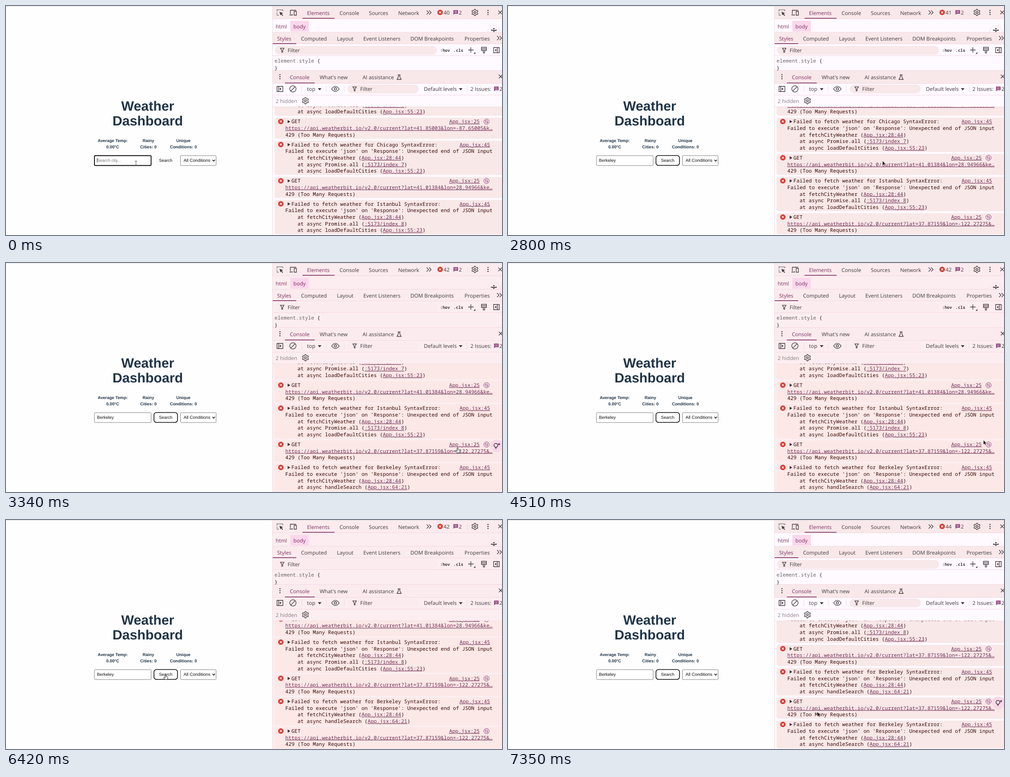
These frames come from a looping animation (1099 by 510 pixels, 8 s). An HTML page:

```html
<!DOCTYPE html>
<html lang="en">
<head>
<meta charset="utf-8">
<title>Weather Dashboard</title>
<style>
  html, body { margin: 0; width: 100%; height: 100%; overflow: hidden; background: #fefefe; }
  svg { display: block; width: 100%; height: 100%; --bar: #f8e8ea; --body: #fffaff; --row: #f8e8e8; }
  svg.warm { --bar: #fbebee; --body: #fcedf0; --row: #fbe8e7; }
  text { white-space: pre; text-rendering: geometricPrecision; }
  .page { font-family: "Liberation Sans", Arial, sans-serif; }
  .bold { font-weight: 700; fill: #213547; }
  .ui { font: 500 11.65px "Open Sans", "Noto Sans", sans-serif; fill: #41383d; }
  .on { fill: #7c2e62; }
  .mono { font: 11.25px "Noto Sans Mono", "DejaVu Sans Mono", monospace; fill: #380a08; }
  .link { fill: #743058; text-decoration: underline 1px; text-underline-offset: 1px; }
  .bar { fill: var(--bar); }
  .body { fill: var(--body); }
  .row { fill: var(--row); }
  .sep { stroke: #f5d7e3; fill: none; }
  .ico { stroke: #41383d; fill: none; stroke-width: 1.3; }
  .solid { fill: #41383d; }
</style>
</head>
<body>
<svg id="stage" viewBox="0 0 1099 510" preserveAspectRatio="none"></svg>
<script>
const stage = document.getElementById('stage');
const LOOP = 8000, LINE = 14.7, GAP = 7.2;

// ---- markup helpers ----
const rect = (x, y, w, h, attrs = '') => `<rect x="${x}" y="${y}" width="${w}" height="${h}" ${attrs}/>`;
const circle = (x, y, r, attrs = '') => `<circle cx="${x}" cy="${y}" r="${r}" ${attrs}/>`;
const path = (d, attrs = 'class="ico"') => `<path d="${d}" ${attrs}/>`;
const text = (x, y, s, attrs) => `<text x="${x}" y="${y}" ${attrs}>${s}</text>`;
const ui = (x, y, s, extra = '') => text(x, y, s, `class="ui ${extra}"`);
const mono = (x, y, s, extra = '') => text(x, y, s, `class="mono" ${extra}`);
const link = s => `<tspan class="link">${s}</tspan>`;
const at = (x, y, s, attrs = '') => `<g transform="translate(${x} ${y})" ${attrs}>${s}</g>`;

// ---- icons ----
const errorIcon = (x, y) => at(x, y, circle(0, 0, 6, 'fill="#dc362e"') +
  path('M-2.3-2.3L2.3 2.3M2.3-2.3L-2.3 2.3', 'stroke="#fff" stroke-width="1.3"'));
const issueIcon = (x, y) => at(x, y, path('M-5-5H5V3H-2.5L-5 5.5Z', 'fill="#8b3a78"') +
  path('M-3-2.4H3M-3 .4H3', 'stroke="#f8e8ea" stroke-width="1.1"'));
// Six teeth: two outer and two inner corners each
const gearOutline = Array.from({ length: 24 }, (_, i) => {
  const angle = (i - .5) * Math.PI / 12, r = i % 4 < 2 ? 7.2 : 5.2;
  return (r * Math.sin(angle)).toFixed(2) + ' ' + (-r * Math.cos(angle)).toFixed(2);
}).join('L');
const gear = (x, y) => at(x, y, path(`M${gearOutline}Z`, 'class="ico" stroke-linejoin="round"') + circle(0, 0, 2.2, 'class="ico"'));
const dots = (x, y) => [-4.5, 0, 4.5].map(d => circle(x, y + d, 1.35, 'class="solid"')).join('');
const chevrons = (x, y) => at(x, y, path('M-5-4.5L-.5 0L-5 4.5M.5-4.5L5 0L.5 4.5'));
const cross = (x, y) => at(x, y, path('M-4-4L4 4M4-4L-4 4'));
const funnel = (x, y) => at(x, y, path('M-4-4.5H4L1 0V4.5H-1V0Z'));
const down = (x, y) => path(`M${x - 4} ${y - 2}h8l-4 5z`, 'class="solid"');

function page() {
  const mid = (x, y, s, size) => text(x, y, s, `class="page bold" font-size="${size}" text-anchor="middle"`);
  const stat = (x, a, b) => mid(x, 303, a, 9.35) + mid(x, 317, b, 9.35);
  return rect(0, 0, 1099, 510, 'fill="#fefefe"') +
    mid(314, 233.4, 'Weather', 29.9) + mid(314, 266.2, 'Dashboard', 29.9) +
    stat(236.5, 'Average Temp:', '0.00°C') + stat(315.5, 'Rainy', 'Cities: 0') + stat(393, 'Unique', 'Conditions: 0') +
    rect(196, 333.3, 125.5, 22, 'id="field" rx="1.5" fill="#fff"') +
    text(201.5, 347, '', 'id="typed" class="page"') +
    rect(0, 338.5, .9, 10, 'id="caret" fill="#222"') +
    rect(327.8, 333, 52.2, 22, 'id="button" rx="5.5" fill="#fdfdfd"') +
    text(339, 346.8, 'Search', 'class="page" font-size="9.35" fill="#111"') +
    rect(386.5, 333.3, 79, 22, 'rx="1.5" fill="#fff" stroke="#808080"') +
    text(393.5, 347.3, 'All Conditions', 'class="page" font-size="9.7" fill="#111"') +
    path('M457.5 342.5L460.3 345.6L463.1 342.5', 'fill="none" stroke="#111" stroke-width="1.5"');
}

function panels() {
  const strip = (y, h, cls) => rect(590, y, 509, h, `class="${cls}"`);
  const lines = [28.5, 58.5, 84.5, 110.5, 143.5, 172.5, 198.5, 224.5]
    .map(y => path(`M590 ${y}H1099`, 'class="sep"')).join('');
  const under = (x, y, w) => rect(x, y, w, 1.6, 'fill="#7c2e62"');
  const tabs = (y, list) => list.map(([x, s, on]) => ui(x, y, s, on ? 'on' : '')).join('');

  const top = path('M600.5 12V8.5H613.5V12M600.5 15V20.5H605', 'class="ico" stroke-dasharray="2 1.4"') +
    path('M606 13L614 16L610.7 17.4L614 20.7L612.7 22L609.4 18.7L608 21Z', 'class="solid"') +
    path('M630 18V9.5H643M628 20H636M638.5 12H643.5V20.5H638.5Z') +
    tabs(20, [[667, 'Elements', 1], [739, 'Console'], [804, 'Sources'], [869, 'Network']]) +
    under(657, 26.6, 71) + chevrons(937, 14.5) + errorIcon(962, 14.3) + ui(969.6, 18.6, '', 'count') +
    issueIcon(996.5, 14.3) + ui(1003.3, 18.6, '2') + path('M1022.5 8V22', 'class="sep"') +
    gear(1039, 14.3) + dots(1068, 14.3) + cross(1095, 14.3);

  const crumbs = rect(630, 33, 41, 24, 'fill="#fbd7ec"') + ui(597.5, 50, 'html', 'on') + ui(636.8, 50, 'body', 'on') +
    `<clipPath id="crumbClip">${rect(1060, 30, 39, 28)}</clipPath><g clip-path="url(#crumbClip)">` +
    circle(1081, 57, 13.5, 'class="body" stroke="#f3dfe8"') + circle(1081, 50.6, 1.6, 'class="solid"') +
    path('M1074.5 53.5Q1081 55.5 1087.5 53.5M1081 54V60', 'class="ico" style="stroke-width:1.9"') + '</g>';

  const styles = tabs(77, [[600.7, 'Styles', 1], [653.7, 'Computed'], [733.3, 'Layout'], [791.7, 'Event Listeners'],
    [896, 'DOM Breakpoints'], [1016, 'Properties']]) + under(590, 83, 53) + chevrons(1093, 71.5) +
    rect(596, 89, 359, 19.5, 'rx="9.7" class="bar"') + funnel(612, 98.7) + ui(624, 103, 'Filter') +
    [[962, ':hov'], [991.5, '.cls']].map(([x, s]) => mono(x, 101.8, s, 'style="font-size:9px;font-weight:600;fill:#3d3439"')).join('') +
    path('M1024 98H1036M1030 92V104') + path('M1036 106.5h4v-4z', 'class="solid"') +
    path('M1053.5 92H1064.5V99H1053.5ZM1053.5 95.5H1064.5M1057.5 99V104.5H1060.5V99') +
    path('M1080.5 92.5H1093V104H1080.5ZM1089 92.5V104') + path('M1086.5 95v6.4l-3.4-3.2z', 'class="solid"') +
    mono(595, 126, '<tspan fill="#6c6468">element.style</tspan> {', 'style="fill:#2b2226"') +
    mono(595, 141.5, '}', 'style="fill:#2b2226"');

  const drawer = dots(607, 157.5) +
    tabs(163, [[629, 'Console', 1], [695, "What's new"], [790, 'AI assistance']]) + under(618, 170.6, 66) +
    path('M868 153.5H874M869.5 153.5V157.5L866.3 163.5H875.7L872.5 157.5V153.5') + cross(1096, 157) +
    path('M600.5 179H613.5V190.5H600.5ZM604 179V190.5') + path('M606.5 181.8v6l4-3z', 'class="solid"') +
    circle(635.7, 184.6, 7, 'class="ico"') + path('M630.8 189.5L640.6 179.7') +
    path('M655.5 178V192M709.5 178V192M749.5 178V192M1021.5 178V192', 'class="sep"') +
    ui(667, 189, 'top') + down(695, 185) +
    path('M721.5 184.6Q729.8 173 738.2 184.6Q729.8 196.2 721.5 184.6Z') + circle(729.8, 184.6, 2.6, 'class="ico"') +
    rect(757, 175, 157.5, 19.5, 'rx="9.7" class="bar"') + funnel(772.5, 184.6) + ui(784.8, 189, 'Filter') +
    ui(926, 189, 'Default levels') + down(1007.5, 185) + ui(1029, 189, '2 Issues:') +
    issueIcon(1086.5, 184.6) + ui(1093.3, 189, '2') +
    `<g opacity=".62">${ui(597.5, 216, '2 hidden')}</g>` + gear(663.5, 211);

  return strip(0, 510, 'body') + strip(0, 28, 'bar') + strip(59, 25, 'bar') + strip(144, 28, 'bar') + lines +
    top + crumbs + styles + drawer +
    path('M590.5 0V510', 'stroke="#ecdce2"') + path('M0 .5H1099', 'stroke="#dcdcdc"');
}

// ---- console log ----
const request = coords => ({
  src: 'App.jsx:25', net: true,
  lines: ['  GET', link(`https://api.weatherbit.io/v2.0/current?${coords}…`), '429 (Too Many Requests)']
});
const frame = (fn, loc) => `    at ${fn} (${link(loc)})`;
const failure = (city, ...rest) => ({
  src: 'App.jsx:45',
  lines: [`  Failed to fetch weather for ${city} SyntaxError:`,
    "Failed to execute 'json' on 'Response': Unexpected end of JSON input",
    frame('fetchCityWeather', 'App.jsx:28:44'), ...rest]
});
const loaded = (city, i) => failure(city, frame('async Promise.all', ':5173/index ' + i),
  frame('async loadDefaultCities', 'App.jsx:55:23'));
const searched = () => [request('lat=37.87159&amp;lon=-122.27275&amp;'),
  failure('Berkeley', frame('async handleSearch', 'App.jsx:64:21'))];

const log = [
  loaded('Toronto', 6),
  request('lat=41.85003&amp;lon=-87.65005&amp;k'), loaded('Chicago', 7),
  request('lat=41.01384&amp;lon=28.94966&amp;ke'), loaded('Istanbul', 8),
  ...searched(), ...searched()
];
const rowHeight = row => row.lines.length * LINE + GAP;

function consoleLog() {
  let y = 248.7 - rowHeight(log[0]);
  const rows = log.map(row => {
    const mid = y + 8.8, base = mid + 3.7;
    const out = `<g>${rect(595, y, 512, rowHeight(row) - 4.4, 'rx="5" class="row"')}` +
      errorIcon(609, mid - .3) + path(`M624 ${mid - 3.6}v7.2l6-3.6z`, 'class="solid"') +
      row.lines.map((s, i) => mono(619, base + i * LINE, s)).join('') +
      mono(row.net ? 982 : 1005, base, link(row.src)) +
      (row.net ? circle(1064.7, mid, 5.8, 'fill="none" stroke="#8b3a78"') +
        at(1064.7, mid, path('M-1.8 3.2V-3M-3.4-1.4L-1.8-3L-.2-1.4M1.8-3.2V3M.2 1.4L1.8 3L3.4 1.4', 'fill="none" stroke="#8b3a78"')) : '') + '</g>';
    y += rowHeight(row);
    return out;
  });
  return `<clipPath id="logClip">${rect(590, 224.5, 509, 286)}</clipPath>` +
    `<g clip-path="url(#logClip)"><g id="log">${rows.join('')}</g></g>`;
}

const hint = `<g id="hint">${circle(0, 0, 12.8, 'fill="#fbd9ec" stroke="#eec6dc"')}` +
  circle(-1.5, -1, 4.2, 'class="ico" style="stroke-width:1.6"') + path('M-3.5 4.5H.5M-2.5 6.8H-.5') +
  path('M5.5-6.8L6.4-4.4L8.8-3.5L6.4-2.6L5.5-.2L4.6-2.6L2.2-3.5L4.6-4.4Z', 'class="solid"') + '</g>';

const cursors = `<g id="cursor">
  ${path('M0 0V9.8L2.2 7.8L3.7 11L5.1 10.4L3.7 7.2H6.7Z', 'data-kind="arrow" fill="#000" stroke="#fff" stroke-width=".5"')}
  ${path('M-1 .8C-1-.4 1-.4 1 .8V4.6L4 5.2Q5.2 5.6 5 7.3L4 11.8H-1.6L-4.4 7.8Q-4.2 6-2.8 7L-1 8.2Z', 'data-kind="hand" fill="#fff" stroke="#111" stroke-width=".9"')}
  ${path('M-3-4.7H-1Q0-4.7 0-3.7V3.7Q0 4.7-1 4.7H-3M3-4.7H1Q0-4.7 0-3.7M0 3.7Q0 4.7 1 4.7H3', 'data-kind="beam" fill="none" stroke="#444" stroke-width=".9"')}</g>`;

stage.innerHTML = page() + panels() + consoleLog() + hint + cursors;

// ---- timelines: each entry holds until the next ----
const pointer = [
  [0, 'beam', 288, 350], [1630, 'beam', 289, 348], [1750, 'beam', 294, 346], [1870, 'beam', 299, 344],
  [1990, 'arrow', 336, 345], [2140, 'hand', 345, 346], [2290, 'hand', 355, 347], [2560, 'arrow', 470, 352],
  [2680, 'arrow', 650, 350], [2800, 'arrow', 830, 345], [2920, 'arrow', 960, 350], [3040, 'arrow', 1035, 416],
  [3190, 'arrow', 1020, 416], [3340, 'hand', 1000.5, 411], [3720, 'arrow', 1012, 352], [3850, 'arrow', 1008, 330],
  [4100, 'arrow', 1022, 345], [4220, 'arrow', 1045, 372], [4340, 'arrow', 1057, 388], [4510, 'arrow', 1053.5, 394.5],
  [4640, 'arrow', 1058, 411], [4790, 'arrow', 1058, 432], [5050, 'arrow', 950, 380], [5170, 'arrow', 720, 385],
  [5290, 'arrow', 486, 371], [5440, 'arrow', 486, 358], [5590, 'arrow', 400, 350], [5720, 'hand', 358, 342],
  [5870, 'hand', 353.5, 343.5], [6720, 'arrow', 430, 352], [6840, 'arrow', 560, 366], [6960, 'arrow', 650, 374],
  [7080, 'arrow', 688, 378], [7230, 'arrow', 686, 410], [7350, 'arrow', 685.5, 427.5]
];
const typing = [[0, 0], [280, 1], [530, 2], [650, 3], [770, 5], [920, 6], [1070, 7], [1350, 8]];
const scrolls = [[0, 0], [2680, 1], [3190, 2], [6420, 3], [6570, 4]];
const counts = [[0, 40], [2680, 41], [3190, 42], [6570, 44]];
const hints = [[0, 0], [2920, 342], [3190, 407], [3720, 327], [4510, 0], [4640, 407], [5050, 327], [5290, 0], [7080, 341], [7230, 407]];
const current = (list, t) => list.findLast(e => e[0] <= t);

const el = id => document.getElementById(id);
const [field, typed, caret, button, logBox, hintBox, cursor] =
  ['field', 'typed', 'caret', 'button', 'log', 'hint', 'cursor'].map(el);
const count = stage.querySelector('.count');
const set = (node, attrs) => { for (const k in attrs) node.setAttribute(k, attrs[k]); };

function draw(t) {
  const chars = current(typing, t)[1], focused = t < 2440;
  typed.textContent = chars ? 'Berkeley'.slice(0, chars) : 'Search city...';
  set(typed, { fill: chars ? '#111' : '#757575', 'font-size': chars ? 9.6 : 9.35 });
  set(caret, { x: chars ? 202 + typed.getComputedTextLength() : 201.6, opacity: t < 1630 ? 1 : 0 });
  set(field, { stroke: focused ? '#101010' : '#808080', 'stroke-width': focused ? 1.9 : 1 });
  set(button, {
    stroke: focused ? (t < 2140 ? 'none' : '#646cff') : '#101010',
    'stroke-width': focused ? .8 : 1.6
  });

  const added = log.slice(5, 5 + current(scrolls, t)[1]);
  const shift = added.reduce((sum, row) => sum + rowHeight(row), 0);
  set(logBox, { transform: `translate(0 ${-shift})` });
  count.textContent = current(counts, t)[1];
  stage.classList.toggle('warm', t >= 3190 && t < 6570);

  const hintY = current(hints, t)[1];
  set(hintBox, { transform: `translate(1087 ${hintY})`, visibility: hintY ? 'visible' : 'hidden' });

  const [, kind, x, y] = current(pointer, t);
  set(cursor, { transform: `translate(${x} ${y})` });
  for (const shape of cursor.children) set(shape, { visibility: shape.dataset.kind === kind ? 'visible' : 'hidden' });
}

const start = performance.now();
function tick() {
  draw((performance.now() - start) % LOOP);
  requestAnimationFrame(tick);
}
tick();
</script>
</body>
</html>
```
